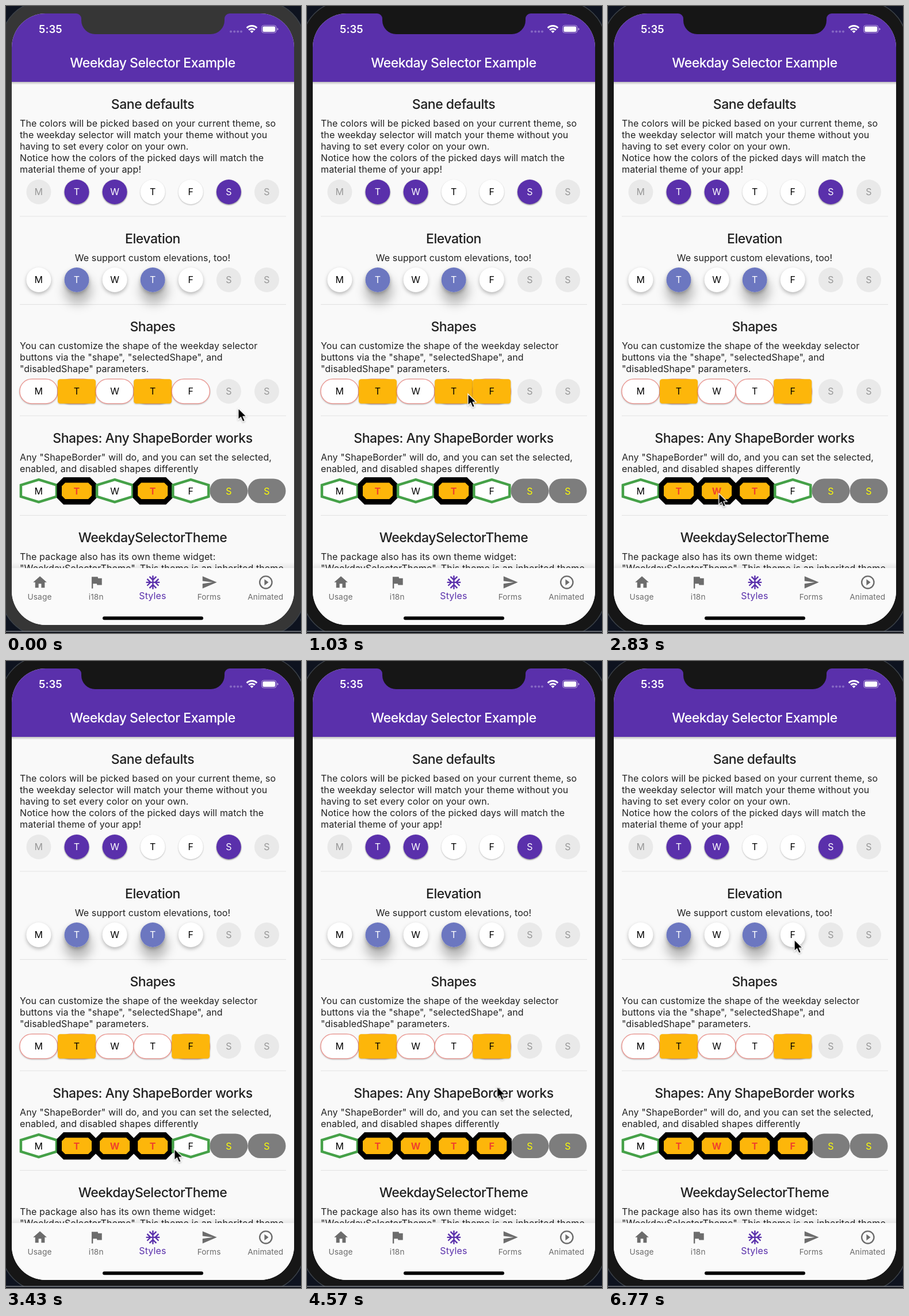
An HTML page that plays this animation: 513 px wide and 1091 px high, repeating every 6.81 s.

```html
<!DOCTYPE html>
<html lang="en">
<head>
<meta charset="utf-8">
<title>Weekday Selector Example</title>
<style>
html, body { margin: 0; width: 100%; height: 100%; overflow: hidden; background: #0e131f; }
svg { display: block; width: 513px; height: 1091px; }
text { font-family: Inter, "Open Sans", sans-serif; font-optical-sizing: none; font-size: 16px; letter-spacing: .11px; fill: #212121; }
.mid { text-anchor: middle; }
.head { font-size: 23px; font-weight: 500; letter-spacing: -.47px; }
.nav { font-size: 13.7px; fill: #6c6c6c; }
.clock { font-size: 18.5px; font-weight: 600; fill: #fff; }
.low { filter: drop-shadow(0 1.5px 1.2px #0004); }
.raised { filter: drop-shadow(0 3.5px 3px #0004); }
.deep { filter: blur(9px); fill: #00000040; }
</style>
</head>
<body>
<script>
const LOOP = 6810;
const BEZEL_FOCUS = 350;
const DAYS = 'MTWTFSS';
const PITCH = 66.1;
const PURPLE = '#5a30ab';
const rules = [];

// Registers keyframes given in milliseconds and returns the animation style.
function animate(frames, timing = 'linear') {
  const name = 'k' + rules.length;
  const body = frames.map(([ms, css]) => `${(ms / LOOP * 100).toFixed(3)}%{${css}}`).join('');
  rules.push(`@keyframes ${name}{${body}}`);
  return `animation:${name} ${LOOP}ms ${timing} infinite`;
}

function toggle(selected, flips, off, on, delay = 0) {
  const css = () => selected ? on : off;
  const frames = [[0, css()]];
  for (const ms of flips) {
    frames.push([ms + delay, css()]);
    selected = !selected;
    frames.push([ms + delay + 120, css()]);
  }
  frames.push([LOOP, css()]);
  return animate(frames);
}

const text = (x, y, value, cls = '', style = '') =>
  `<text x="${x}" y="${y}" class="${cls}" style="${style}">${value}</text>`;
const heading = (y, value) => text(255, y, value, 'mid head');
const lines = (y, ...values) => values.map((v, i) => text(24, y + i * 20.2, v)).join('');
const divider = y => `<path d="M24 ${y}H487" stroke="#e4e4e4" stroke-width="1.2"/>`;

const circle = (x, y, fill, cls = '') => `<circle cx="${x}" cy="${y}" r="21.5" fill="${fill}" class="${cls}"/>`;
const box = (x, y, r, fill, extra = '') =>
  `<rect x="${x - 33}" y="${y - 21.3}" width="66" height="42.6" rx="${r}" fill="${fill}" ${extra}/>`;
const hexagon = (x, y) =>
  `<path d="M${x - 31} ${y - 10}l31-9.5 31 9.5v20l-31 9.5-31-9.5z" fill="#fff" stroke="#45a148" stroke-width="4.5"/>`;
const bevel = (x, y, w, h, cut, fill) =>
  `<path d="M${x - w + cut} ${y - h}H${x + w - cut}l${cut} ${cut}V${y + h - cut}l${-cut} ${cut}H${x - w + cut}l${-cut} ${-cut}V${y - h + cut}z" fill="${fill}"/>`;

const plainDisabled = (x, y) => circle(x, y, '#e9e9e9');

const rows = [
  { y: 323.5, states: '-xx..x-', flips: {}, ink: ['#000', '#fff', '#969696'],
    off: (x, y) => circle(x, y, '#fff', 'low'),
    on: (x, y) => circle(x, y, PURPLE, 'low'),
    disabled: plainDisabled },
  { y: 476.5, states: '.x.x.--', flips: { 4: [5370, 6200] }, ink: ['#000', '#fff', '#969696'],
    off: (x, y) => circle(x, y, '#fff', 'raised'),
    on: (x, y) => circle(x, y, '#6c77c0'),
    disabled: plainDisabled, elevated: true },
  { y: 670.5, states: '.x.x.--', flips: { 3: [1300], 4: [430] }, ink: ['#000', '#000', '#969696'],
    off: (x, y) => `<g class="low">${box(x, y, 21, '#fff', 'stroke="#ec918b" stroke-width="1.3"')}</g>`,
    on: (x, y) => `<g class="low">${box(x, y, 4.5, '#fdb60a')}</g>`,
    disabled: plainDisabled },
  { y: 843.7, states: '.x.x.--', flips: { 2: [2650], 4: [3680] }, ink: ['#000', '#f0432b', '#ffff00'], bold: true,
    off: hexagon,
    on: (x, y) => bevel(x, y, 34.5, 23.7, 11.5, '#000') + bevel(x, y, 26, 14.2, 6, '#fdb60a'),
    disabled: (x, y) => box(x, y, 21.3, '#7d7d7d') }
];

function cell(row, i) {
  const x = +(56.9 + i * PITCH).toFixed(1);
  const { y, ink } = row;
  const label = style => text(x, y + 5.8, DAYS[i], 'mid', style);
  if (row.states[i] === '-') return row.disabled(x, y) + label(`fill:${ink[2]}`);

  const selected = row.states[i] === 'x';
  const flips = row.flips[i] || [];
  const fade = delay => toggle(selected, flips, 'opacity:0', 'opacity:1', delay);
  const weight = row.bold ? 700 : 400;
  const shadow = row.elevated
    ? `<g style="${fade(130)}"><circle cx="${x + 2}" cy="${y + 18}" r="24" class="deep"/></g>` : '';
  const press = row.elevated && flips.length
    ? `<g style="${animate([[0, 'opacity:0'], [flips[0] - 20, 'opacity:0'], [flips[0] + 80, 'opacity:1'],
        [flips[0] + 180, 'opacity:1'], [flips[0] + 380, 'opacity:0'], [LOOP, 'opacity:0']])}">${circle(x, y, '#30205040')}</g>` : '';
  const inkStyle = toggle(selected, flips, `fill:${ink[0]};font-weight:400`,
    `fill:${ink[1]};font-weight:${weight}`, row.elevated ? 130 : 0);
  return shadow + row.off(x, y) + `<g style="${fade(0)}">${row.on(x, y)}</g>` + press + label(inkStyle);
}

// Disabled days lie beneath the borders of their neighbours.
function selector(row) {
  const order = [...DAYS.keys?.() ?? [...DAYS].keys()];
  const disabled = i => row.states[i] === '-';
  return [...order.filter(disabled), ...order.filter(i => !disabled(i))].map(i => cell(row, i)).join('');
}

const tabs = [
  ['Usage', 'M10 20v-6h4v6h5v-8h3L12 3 2 12h3v8z'],
  ['i18n', 'M14.4 6L14 4H5v17h2v-7h5.6l.4 2h7V6z'],
  ['Styles', ''],
  ['Forms', 'M2 21L23 12 2 3v7l15 2-15 2z'],
  ['Animated', 'M10 16.5l6-4.5-6-4.5z']
];

// Snowflake: four crossing bars, each with a chevron near its end.
const snowflake = [0, 90, 180, 270].map(a =>
  `<path transform="rotate(${a} 12 12)" d="M12 12V2M7 3.6l5 5 5-5" fill="none" stroke="${PURPLE}" stroke-width="2"/>`).join('');

function tab([name, path], i) {
  const x = 59 + i * 98.2;
  const active = name === 'Styles';
  const ring = name === 'Animated' ? '<circle cx="12" cy="12" r="9" fill="none" stroke="#6c6c6c" stroke-width="2"/>' : '';
  const icon = active ? snowflake : `<path d="${path}" fill="#6c6c6c"/>${ring}`;
  return `<g transform="translate(${x - 14.2} 988.6) scale(1.186)">${icon}</g>` +
    text(x - .5, active ? 1032.3 : 1032.7, name, active ? 'mid' : 'mid nav', active ? `fill:${PURPLE}` : '');
}

const arc = r => {
  const d = r * Math.SQRT1_2;
  return `<path d="M${427.5 - d} ${47 - d}A${r} ${r} 0 0 1 ${427.5 + d} ${47 - d}" fill="none" stroke="#fff" stroke-width="3"/>`;
};

const statusBar = text(57, 47, '5:35', 'clock') +
  [391, 397.2, 403.2, 409].map(x => `<circle cx="${x}" cy="44.5" r="2" fill="#8668c4"/>`).join('') +
  arc(12.4) + arc(7.6) + '<path d="M427.5 47l-3-3a4.2 4.2 0 0 1 6 0z" fill="#fff"/>' +
  '<rect x="444.5" y="33.7" width="25.5" height="13" rx="3.8" fill="none" stroke="#b9a5dd"/>' +
  '<rect x="446.3" y="35.5" width="21.9" height="9.4" rx="2.2" fill="#fff"/>' +
  '<path d="M471.5 38q2 .6 2 2.2t-2 2.2z" fill="#b9a5dd"/>';

const bezel = animate([[0, 'fill:#363636'], [BEZEL_FOCUS, 'fill:#161616'], [LOOP, 'fill:#161616']], 'step-end');

const path = [
  [0, 404, 700], [300, 325, 676], [650, 325, 676], [1030, 280, 675], [1200, 259, 678], [1600, 259, 678],
  [1950, 189, 678], [2060, 188.5, 678], [2500, 190, 846], [3000, 194, 849], [3430, 292.5, 849],
  [3600, 322, 849], [4050, 322, 847], [4570, 330.5, 741], [5100, 324, 485], [LOOP, 324, 485]
];
const pointer = animate(path.map(([ms, x, y]) => [ms, `transform:translate(${x}px,${y}px)`]));

document.body.innerHTML = `
<svg viewBox="0 0 513 1091">
  <defs>
    <clipPath id="screen"><rect x="10" y="13" width="491" height="1064" rx="59"/></clipPath>
    <linearGradient id="shade" x2="0" y2="1"><stop stop-color="#0000"/><stop offset="1" stop-color="#00000012"/></linearGradient>
    <linearGradient id="drop" x2="0" y2="1"><stop stop-color="#0000003c"/><stop offset="1" stop-color="#0000"/></linearGradient>
  </defs>
  <rect x="-8" y="-8" width="527" height="1104" rx="72" stroke="#3b4148" stroke-width="1.5" style="${bezel}"/>
  <rect y="1087.5" width="513" height="1.5" fill="#82878d"/>
  <rect y="1089" width="513" height="2" fill="#12151d"/>
  <g clip-path="url(#screen)">
    <rect x="10" y="13" width="491" height="1064" fill="#f9f9f9"/>
    ${heading(178.5, 'Sane defaults')}
    ${lines(209.5, 'The colors will be picked based on your current theme, so',
      'the weekday selector will match your theme without you',
      'having to set every color on your own.',
      'Notice how the colors of the picked days will match the',
      'material theme of your app!')}
    ${[366, 519.3, 713, 886.3].map(divider).join('')}
    ${heading(412.5, 'Elevation')}
    ${text(255, 443.5, 'We support custom elevations, too!', 'mid')}
    ${heading(566, 'Shapes')}
    ${lines(596.8, 'You can customize the shape of the weekday selector',
      'buttons via the "shape", "selectedShape", and',
      '"disabledShape" parameters.')}
    ${heading(759.5, 'Shapes: Any ShapeBorder works')}
    ${lines(790.5, 'Any "ShapeBorder" will do, and you can set the selected,',
      'enabled, and disabled shapes differently')}
    ${heading(933, 'WeekdaySelectorTheme')}
    ${lines(963.7, 'The package also has its own theme widget:',
      '"WeekdaySelectorTheme". This theme is an inherited theme')}
    ${rows.map(selector).join('')}
    <rect x="10" y="132" width="491" height="5" fill="url(#drop)"/>
    <rect x="10" y="13" width="491" height="119" fill="${PURPLE}"/>
    ${text(255, 107, 'Weekday Selector Example', 'mid head', 'fill:#fff')}
    ${statusBar}
    <rect x="10" y="968" width="491" height="10" fill="url(#shade)"/>
    <rect x="10" y="978" width="491" height="100" fill="#fafafa"/>
    ${tabs.map(tab).join('')}
    <rect x="168" y="1062.3" width="175" height="6" rx="3" fill="#000"/>
  </g>
  <path d="M122 12V13a9 9 0 0 1 9 9v3a24 24 0 0 0 24 24H356a24 24 0 0 0 24-24v-3a9 9 0 0 1 9-9V12z" style="${bezel}"/>
  <g style="${pointer}">
    <path class="low" transform="scale(1.14)" d="M0 0V17.5l4-3.8 3 6.8 3.2-1.4-2.9-6.6H12.6z" fill="#000" stroke="#fff" stroke-width="1.2"/>
  </g>
</svg>`;

const sheet = document.createElement('style');
sheet.textContent = rules.join('\n');
document.head.append(sheet);
</script>
</body>
</html>
```
